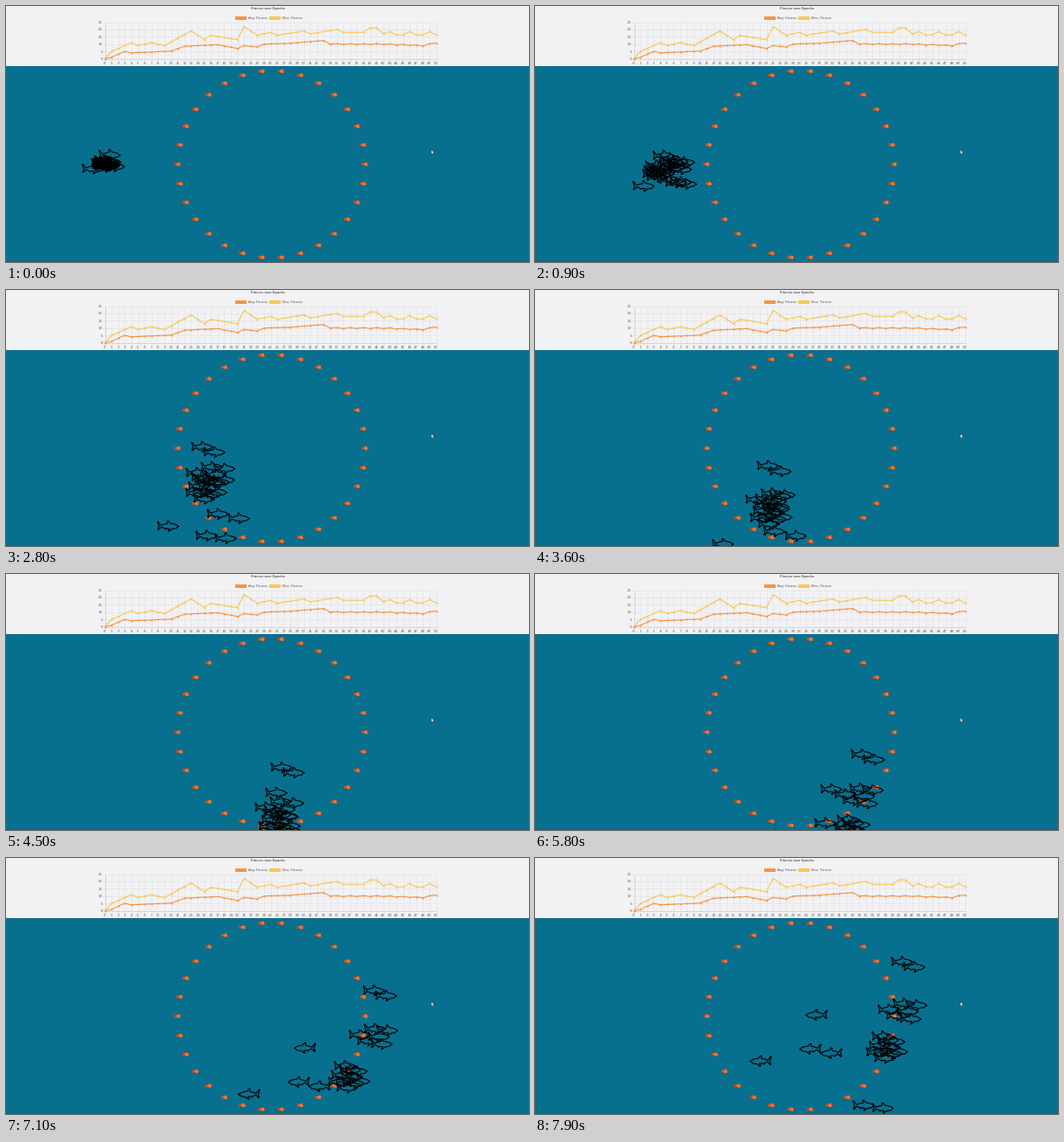
Animation, 600 px wide and 294 px high, one loop 8 s. Source, as a matplotlib script:

```python
import numpy as np
import matplotlib.pyplot as plt
from matplotlib.animation import FuncAnimation
from matplotlib.collections import LineCollection, PolyCollection
from matplotlib.patches import Ellipse, Polygon, Rectangle

W, H, DPI = 600, 294, 100
FRAMES, STEP = 80, 100
PT = 72 / DPI
ORANGE, YELLOW, GREY = "#f9923d", "#f8c74e", "#5c5c5c"

plt.rcParams["font.family"] = "Liberation Sans"
fig = plt.figure(figsize=(W / DPI, H / DPI), dpi=DPI, facecolor="#f2f1f3")
ax = fig.add_axes([0, 0, 1, 1])
ax.set(xlim=(0, W), ylim=(H, 0))
ax.axis("off")


def label(x, y, s, ha="center", size=4.4, **kw):
    ax.text(x, y, s, ha=ha, va="center_baseline", color=GREY, fontsize=size * PT, **kw)


# Fitness chart
X0, X1, Y0, Y1 = 113.5, 493.5, 60.5, 18.5
EPOCHS = np.arange(51)


def px(epoch):
    return X0 + epoch * (X1 - X0) / 50


def py(value):
    return Y0 + value * (Y1 - Y0) / 25


def series(knots, amp, period, since):
    """Line through the knots, with a ripple in the late epochs."""
    ripple = amp * np.cos(2 * np.pi * (EPOCHS - since) / period)
    return np.interp(EPOCHS, *zip(*knots)) + ripple * (EPOCHS >= since)


best = series([(0, 0), (1, 5), (4, 11), (5, 9), (7, 11), (9, 9), (13, 19), (15, 13),
               (16, 16), (20, 13), (21, 22), (23, 16), (25, 18), (26, 16), (30, 19),
               (31, 17), (35, 20), (36, 18), (39, 18), (40, 21), (41, 21), (42, 17),
               (50, 17)], 1.5, 3, 43)
mean = series([(0, 0), (1, 1), (3, 5), (4, 4), (10, 5.2), (12, 8.5), (17, 9.6), (20, 7),
               (21, 9), (23, 8), (24, 10), (28, 10.6), (33, 12.4), (34, 10), (42, 10),
               (48, 9), (50, 11)], 0.3, 2, 35)

grid = [[(px(e), Y1), (px(e), Y0 + 3)] for e in EPOCHS]
grid += [[(X0 - 3, py(v)), (X1, py(v))] for v in range(0, 26, 5)]
ax.add_collection(LineCollection(grid, colors="#e0e0e2", linewidths=0.5 * PT))
ax.plot([X0, X0, X1], [Y1, Y0, Y0], color="#c8c8ca", lw=0.6 * PT)

label(300.5, 2.6, "Fitness over Epochs", size=4, weight="bold")
for x, name, color in [(263, "Avg. Fitness", ORANGE), (302, "Max. Fitness", YELLOW)]:
    ax.add_patch(Rectangle((x, 11.5), 13, 4.2, color=color, lw=0))
    label(x + 14.6, 13.4, name, ha="left", size=4)
for v in range(0, 26, 5):
    label(111, py(v), v, ha="right")
for e in EPOCHS:
    label(px(e), 65.8, e)
for data, color in [(best, YELLOW), (mean, ORANGE)]:
    ax.plot(px(EPOCHS), py(data), color=color, lw=1.1 * PT, marker="o", ms=2 * PT, mew=0)

# Water and the ring of fish
ax.add_patch(Rectangle((0, 69), W, H, color="#08708f", lw=0))
TAIL = np.array([(-0.5, 0), (-4.4, -2.3), (-3.4, 0), (-4.4, 2.3)])


def draw_fish(x, y):
    edge = dict(ec="#6f4a3c", lw=0.45 * PT)
    ax.add_patch(Polygon(TAIL + (x, y), fc="#e8662c", **edge))
    ax.add_patch(Ellipse((x + 0.9, y), 6, 4.5, fc="#f0702f", **edge))
    ax.plot([x + 1.4] * 2, [y - 1.3, y + 1.3], color="#e0a488", lw=0.5 * PT)
    ax.add_patch(Ellipse((x + 2.7, y - 0.4), 0.9, 0.9, fc="#222222", lw=0))


for a in np.radians(np.arange(0, 360, 12)):
    draw_fish(304.5 + 107.5 * np.cos(a), 181.7 - 107.5 * np.sin(a))

# Schools of sharks: a shared path, plus a formation that opens up after the start
TIMES = np.array([0, 1.6, 2.8, 4.5, 5.8, 7.1, 7.9])
SPREAD = np.array([0.3, 0.7, 1, 1, 1, 1, 1])
START = (115, 181)
rng = np.random.default_rng(4)


def scatter(n, rx, ry):
    """Even sunflower spread inside an ellipse, in random order."""
    k = rng.permutation(n)
    r, a = np.sqrt((k + 0.5) / n), k * 2.4
    return np.stack([rx * r * np.cos(a), ry * r * np.sin(a)], axis=1)


SCHOOLS = [
    # leaders
    ([(180, 171), (232, 183), (323, 225), (382, 210), (429, 155), (428, 122)],
     [(-7, -3), (7, 3)]),
    # turning back
    ([(181, 212), (237, 252), (297, 285), (327, 281), (330, 252), (310, 214)],
     [(13, -34), (6, 5), (30, 10), (-51, 19)]),
    # chasers
    ([(196, 188), (235, 212), (314, 270), (372, 255), (422, 205), (422, 176)],
     scatter(6, 19, 14)),
    # core
    ([(167, 199), (230, 227), (314, 284), (364, 294), (394, 251), (404, 217)],
     scatter(10, 13, 16)),
    # stragglers
    ([(203, 225), (241, 283), (295, 330), (348, 343), (388, 322), (388, 285)],
     [(-11, -1), (11, 2)]),
]
poses = np.concatenate([
    np.array([START, *path])[:, None] + SPREAD[:, None, None] * np.array(formation)
    for path, formation in SCHOOLS], axis=1)
slopes = np.gradient(poses, TIMES, axis=0)


def swim(t):
    """Cubic Hermite position of every shark at time t."""
    i = min(np.searchsorted(TIMES, t, side="right") - 1, len(TIMES) - 2)
    d = TIMES[i + 1] - TIMES[i]
    u = (t - TIMES[i]) / d
    ease = u * u * (3 - 2 * u)
    return (poses[i] * (1 - ease) + poses[i + 1] * ease
            + d * u * (1 - u) * (slopes[i] * (1 - u) - slopes[i + 1] * u))


SHARK = np.array([
    (12.3, 0.6), (9.5, -1.4), (6, -2.5), (2.8, -2.9), (0.2, -6), (-0.9, -5.8),
    (-0.6, -2.9), (-4.5, -2), (-8, -0.7), (-11.6, -5.2), (-12.2, -4.6),
    (-10.4, 0.2), (-11.6, 4.2), (-10.8, 4.3), (-7.8, 1.2), (-4.5, 2.5),
    (-3.2, 4), (-2.4, 2.9), (1.6, 3.2), (0, 6), (1.2, 6), (4.8, 3.3),
    (9.2, 2.9), (10, 1.6)])
sharks = PolyCollection([], facecolors="none", edgecolors="black",
                        linewidths=1.15 * PT, zorder=5)
ax.add_collection(sharks, autolim=False)

# Mouse pointer
POINTER = np.array([(0, 0), (0, 4.6), (1.1, 3.7), (1.9, 5.3), (2.6, 5), (1.9, 3.4), (3.3, 3.3)])
ax.add_patch(Polygon(POINTER + (488, 165.3), fc="white", ec="#333333", lw=0.4 * PT, zorder=6))


def update(n):
    t = n * STEP / 1000
    pos = swim(t)
    turned = swim(t + 0.05)[:, 0] - swim(max(t - 0.05, 0))[:, 0] < -0.5
    flip = np.stack([np.where(turned, -1, 1), np.ones(len(pos))], axis=1)
    sharks.set_verts(SHARK * flip[:, None] + pos[:, None])
    return [sharks]


anim = FuncAnimation(fig, update, frames=FRAMES, interval=STEP, repeat=True,
                     repeat_delay=0, blit=False)
plt.show()
```
